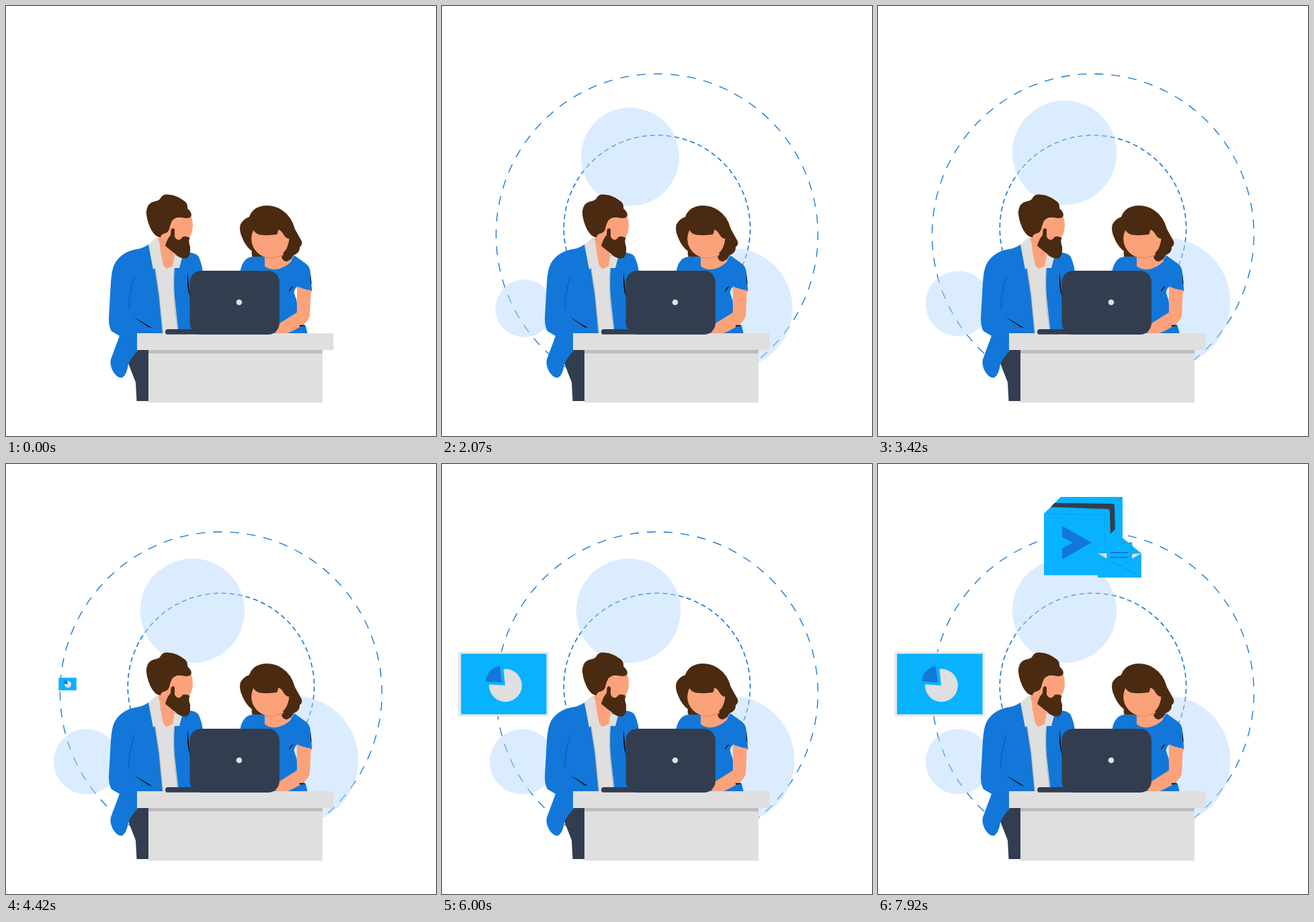
An HTML page that plays this animation: 640x640 px, repeating every 8 s.

```html
<!DOCTYPE html>
<html lang="en">
<head>
<meta charset="utf-8">
<title>Working together</title>
<style>
  html, body { margin: 0; width: 100%; height: 100%; overflow: hidden; background: #fff; }
  svg { display: block; width: 100%; height: 100%; }

  .blue { fill: #1277d8; }
  .sky { fill: #08b2ff; }
  .navy { fill: #323e4f; }
  .grey { fill: #dfdfdf; }
  .skin { fill: #fca27a; }
  .hair { fill: #4a2a10; }
  .line { fill: none; stroke: #1277d8; }
  .crease { fill: none; stroke: #0b4f93; stroke-width: .8; }
  .edge { fill: none; stroke: #bdbdbd; stroke-width: 1.4; }
  .bubble { fill: #b4d7ff; fill-opacity: .47; }

  .ring, .bubble, .pop { animation: 8s linear infinite; }

  /* Rings: pop in with an overshoot while turning steadily. */
  .ring { animation-name: grow, turn; }
  .outer { --peak: 1.165; transform-origin: 320px 340.5px; }
  .inner { --peak: 1.284; transform-origin: 320px 331px; }
  @keyframes grow {
    0%, 6.25% { scale: 0; animation-timing-function: cubic-bezier(.33, 0, .67, 1); }
    15.75% { scale: var(--peak); animation-timing-function: cubic-bezier(.33, 0, .67, 1); }
    18.4%, 100% { scale: 1; }
  }
  @keyframes turn {
    from { rotate: -49.6deg; }
    to { rotate: 67.68deg; }
  }

  /* Bubbles: swell up from a point below their centre. */
  .top { animation-name: swell-top; transform-origin: 320px 319.7px; }
  .left { animation-name: swell-left; transform-origin: 145px 505px; }
  .right { animation-name: swell-right; transform-origin: 482.5px 568px; }
  @keyframes swell-top {
    0%, 6.25% { scale: 0; animation-timing-function: cubic-bezier(.39, .575, .565, 1); }
    32.56%, 100% { scale: 1; }
  }
  @keyframes swell-left {
    0%, 6.25% { scale: 0; animation-timing-function: cubic-bezier(.33, .83, .67, 1); }
    39%, 100% { scale: 1; }
  }
  @keyframes swell-right {
    0%, 6.25% { scale: 0; animation-timing-function: cubic-bezier(.33, .467, .67, .87); }
    29.06%, 100% { scale: 1; }
  }

  .card { animation-name: pop-card; transform-origin: 91.5px 327.5px; }
  .post { animation-name: pop-post; transform-origin: 320px 109px; }
  @keyframes pop-card {
    0%, 52.2% { scale: 0; animation-timing-function: cubic-bezier(.33, 0, .67, 1); }
    62.9% { scale: 1.03; animation-timing-function: cubic-bezier(.33, 0, .67, 1); }
    68.75%, 100% { scale: 1; }
  }
  @keyframes pop-post {
    0%, 80.25% { scale: 0; animation-timing-function: cubic-bezier(.33, 0, .67, 1); }
    91% { scale: 1.05; animation-timing-function: cubic-bezier(.33, 0, .67, 1); }
    96.25%, 100% { scale: 1; }
  }
</style>
</head>
<body>
<svg viewBox="0 0 640 640" aria-label="Two people at a laptop">
  <circle class="ring outer line" cx="320" cy="340.5" r="239.5" stroke-width="1.35" pathLength="60" stroke-dasharray=".53 .47"/>
  <circle class="ring inner line" cx="320" cy="331" r="138.7" stroke-width="1.6" pathLength="72" stroke-dasharray=".6 .4"/>

  <circle class="bubble top" cx="277.5" cy="218.5" r="77.7"/>
  <circle class="bubble left" cx="119.5" cy="443" r="48.5"/>
  <circle class="bubble right" cx="428.5" cy="441" r="96"/>

  <g class="pop card">
    <path fill="#e8e8e8" d="M24 279.5H159V375.5H24Z"/>
    <path class="sky" d="M28.3 282.5H155.5V372.5H28.3Z"/>
    <path class="grey" d="M94 329.5L91.5 305.2A24.5 24.5 0 1 1 70 328Z"/>
    <path class="blue" d="M89 325L86 301A24 24 0 0 0 65 323.5Z"/>
  </g>

  <g class="pop post">
    <path class="sky" d="M247 74L272 49H364V140L337 165.5H247Z"/>
    <path class="line" stroke-width=".5" opacity=".6" d="M247 74L337 75.5L364 49M337 75.5V125"/>
    <path class="navy" d="M257 64L263 58L348 59Q352 59 352 63L353 97L346 104L345 71Q345 67 341 67Z"/>
    <path class="blue" d="M274 92L318 117L274 142V126L290 117L274 109Z"/>
    <path class="line" stroke="#08b2ff" stroke-width=".4" opacity=".5" d="M290 101V133M303 109V125"/>
    <path class="sky" d="M327 133L360 109L364 110L392 133V169H327Z"/>
    <path class="grey" d="M327 133H341V141ZM378 134L392 133L378 141Z"/>
    <path class="sky" d="M340.5 117H378V150H340.5Z"/>
    <path class="line" stroke-width="1.8" d="M346 132H372.5M346 139H372.5"/>
    <path class="line" stroke-width=".6" opacity=".8" d="M341 141L392 169M378 141L360 152M364 117H378V134"/>
  </g>

  <g id="man">
    <path class="navy" d="M182 529L196 511H213V588H194.500L193 560L182 532Z"/>
    <path class="blue" d="M212 355Q203 361 194 362Q172 366 162 383Q157 393 156 412L153 465Q153 478 157 484L169 491L156 526Q154 535 160 545Q167 555 173 553Q180 549 182 533Q187 522 197 512L236 490H274L293 396Q291 381 286 372Q281 367 270 367L262 374Z"/>
    <path class="grey" d="M225 344L212 355L219 392L222 390L228 430L233.500 488H257L250 425V390L258 390L262 375L252 371Z"/>
    <path class="edge" d="M222 391L228 430L233.500 487M250.500 390Q248 415 252 455L256 487"/>
    <path class="skin" d="M226 346Q229 351 230 366L234 386Q239 392 240 391L248 387L251 370L235 344Z"/>
    <path class="skin" d="M230 344Q230 338 240 336L246 317L276 313Q280 327 276 339L270 350L252 366L238 355Z"/>
    <path d="M228 346L238 354" fill="none" stroke="#c98161" stroke-width=".8"/>
    <path class="hair" d="M230 345Q221 343 215 331Q208 315 209 305Q211 293 220 291Q228 290 230 286Q233 280 240 280.500Q254 281 265 290Q271 294 270 301Q276 307 276 311Q275 317 266 315.500Q252 313 247 320Q244 326 243 332Q241 338 234 339Q230 341 230 345Z"/>
    <path class="hair" d="M245.500 334Q246 330.500 249 331Q251.500 331 251 336V343Q253 348 258 348Q261 347 263 343.500Q268 342 273.500 345Q271 350 274 358Q275 372 270 375Q262 378 253 370L237 357Q240 346 245 341Z"/>
    <path class="crease" d="M191 403Q182 432 183 452"/>
    <path d="M189 462L217 479L212 478Z"/>
    <path d="M270 395Q272 415 274 434Q269 420 270 395Z"/>
  </g>

  <g id="woman">
    <path class="hair" d="M367 374Q365 368 366 365Q357 358 352 346Q346 333 349 325Q353 317 362 314Q366 302 378 298.500Q396 294 411 304Q425 313 430 332L440 350Q442 355 437 359Q438 367 428 371Q424 380 417 381Q410 378 408 374Z"/>
    <path class="blue" d="M348.500 396Q350 384 357 377Q362 373 370 373H386L388 387Q404 395 424 379L429 371L447 384Q453 389 453 398L455.500 425L433 418Q428 423 429 428L432.500 438L434 456L441 472L446 476L449 488H350Z"/>
    <path class="skin" d="M385 371V387Q391 393 402 392Q415 390 425 380L410 366Z"/>
    <path fill="none" stroke="#c98161" d="M386 374.500Q398 377 411 371"/>
    <circle class="skin" cx="393.500" cy="346.500" r="28.300"/>
    <path class="hair" d="M365 345Q365 335 368 333Q371 339 378 340.500Q390 342 403 340Q405 338 405 333Q410 334 413 340Q417 347 422 346L425 325L395 309L365 322Z"/>
    <path class="hair" d="M422 343Q421 360 410 374Q415 384 422 378L428 366L427 343Z"/>
    <path class="skin" d="M433 417Q442 422 454 423L452 462Q448 471 440 476Q428 484 416 488L400 489L406 473L433 456Z"/>
    <path d="M421 426Q422 419 428 417Q424 421 421 426ZM437 475Q442 475 446 476L437 477ZM453 397L455 416L453 409Z"/>
  </g>

  <g id="desk">
    <path class="grey" d="M195 487H487.500V512H195ZM212 512H471V590.500H212Z"/>
    <path fill="#bdbdbd" d="M212 512H471V517H212Z"/>
    <rect class="navy" x="237" y="481" width="90" height="7.800" rx="3.900"/>
    <rect class="navy" x="273.500" y="394" width="133.500" height="95" rx="17"/>
    <circle class="grey" cx="347" cy="441" r="4.300"/>
  </g>
</svg>
</body>
</html>
```
